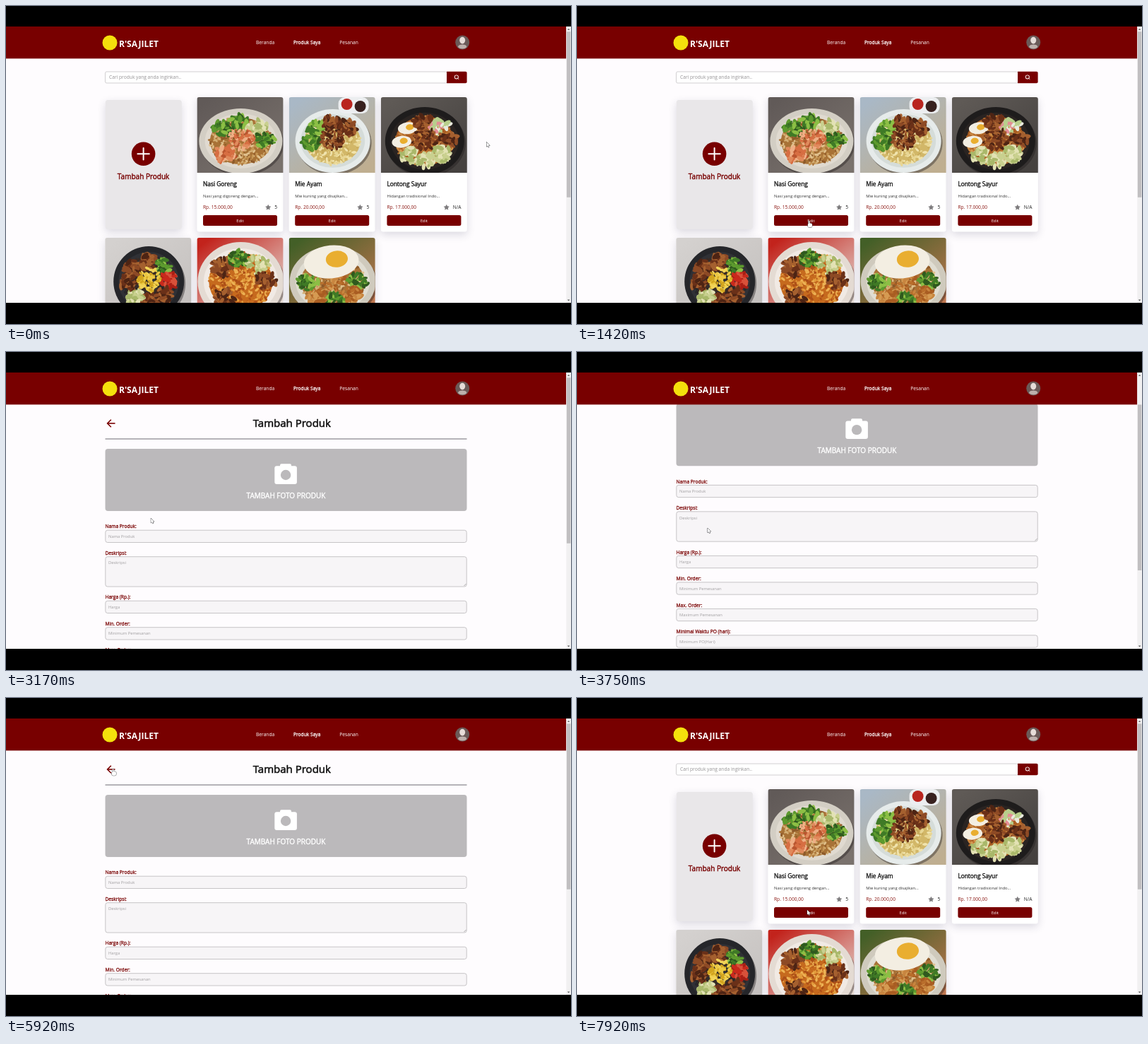
Write an HTML page with a canvas that moves like this. It is 800 px wide and 450 px high and loops after 8000 ms.

```html
<!DOCTYPE html>
<html lang="id">
<head>
<meta charset="utf-8">
<title>Produk Saya</title>
<style>
html, body { margin: 0; width: 100%; height: 100%; overflow: hidden; background: #000; }
canvas { display: block; width: 800px; height: 450px; }
</style>
</head>
<body>
<canvas id="stage"></canvas>
<script>
const canvas = document.getElementById('stage');
const ctx = canvas.getContext('2d');
const dpr = window.devicePixelRatio || 1;
canvas.width = 800 * dpr;
canvas.height = 450 * dpr;

const LOOP = 8000, STEP = 1000 / 12;
const OPEN_FORM = 2330, CLOSE_FORM = 6250;
const LEFT = 140.5, WIDTH = 512, MID = LEFT + WIDTH / 2;
const TOP = 29, BOTTOM = 420, MAX_SCROLL = 226;
const RED = '#780000', PAGE = '#fefcfe';
const FONT = '"Open Sans", "Noto Sans", sans-serif';
// Type sizes: a 1920 px wide page shown at 800 px
const XS = 14 / 2.4, S = 16 / 2.4, M = 20 / 2.4, L = 24 / 2.4, XL = 36 / 2.4;

const ramp = (t, from, to) => Math.min(1, Math.max(0, (t - from) / (to - from)));
const smooth = u => u * u * (3 - 2 * u);

// Pointer moves: start, end, x, y
const MOVES = [
  [0, 830, 460, 300], [916, 1416, 328.5, 304], [1500, 2000, 208.5, 233],
  [3090, 3420, 185, 249], [5500, 5916, 151.5, 100.5], [6420, 7330, 326, 300]
];

function pointerAt(t) {
  return MOVES.reduce(([x, y], [from, to, nx, ny]) => {
    const u = smooth(ramp(t, from, to));
    return [x + (nx - x) * u, y + (ny - y) * u];
  }, [680.5, 192.5]);
}

function scrollAt(t) {
  return MAX_SCROLL * (t < 4667
    ? ramp(t, 3420, 4166) ** 1.55
    : (1 - ramp(t, 4667, 5416)) ** 1.34);
}

function box(x, y, w, h, r, fill, stroke) {
  ctx.beginPath();
  ctx.roundRect(x, y, w, h, r);
  ctx.fillStyle = fill;
  ctx.fill();
  if (!stroke) return;
  ctx.strokeStyle = stroke;
  ctx.lineWidth = 0.85;
  ctx.stroke();
}

function oval(x, y, rx, ry, fill, turn = 0) {
  ctx.beginPath();
  ctx.ellipse(x, y, rx, ry, turn, 0, 2 * Math.PI);
  ctx.fillStyle = fill;
  ctx.fill();
}

function line(pts, color, w) {
  ctx.beginPath();
  pts.forEach(([x, y]) => ctx.lineTo(x, y));
  ctx.strokeStyle = color;
  ctx.lineWidth = w;
  ctx.stroke();
}

function poly(pts, fill) {
  ctx.beginPath();
  pts.forEach(([x, y]) => ctx.lineTo(x, y));
  ctx.fillStyle = fill;
  ctx.fill();
}

const triangle = (x, y, w, h, fill) => poly([[x - w, y], [x, y - h], [x + w, y]], fill);

// bold thickens the regular face slightly without widening it
function text(str, x, y, size, color, { bold = false, align = 'left', weight = 400 } = {}) {
  ctx.font = `${weight} ${size}px ${FONT}`;
  ctx.textAlign = align;
  ctx.fillStyle = color;
  ctx.fillText(str, x, y);
  if (!bold) return;
  ctx.strokeStyle = color;
  ctx.lineWidth = size / 26;
  ctx.lineJoin = 'round';
  ctx.strokeText(str, x, y);
}

const centered = (str, y, size, color, bold) =>
  text(str, MID, y, size, color, { bold, align: 'center' });

function panel(x, y, w, h, fill) {
  ctx.save();
  ctx.shadowColor = 'rgba(40,40,80,.17)';
  ctx.shadowBlur = 12 * dpr;
  ctx.shadowOffsetY = 4 * dpr;
  box(x, y, w, h, 3.5, fill);
  ctx.restore();
}

// ---- Food pictures ----

const FOOD = {
  green: ['#2f5a1e', '#5d9a2e', '#8cbf45', '#3f7a26'],
  pale: ['#c9d08f', '#e3e2b4', '#a9b86a'],
  meat: ['#4d2414', '#6a3018', '#8d4a25', '#a5602f'],
  shrimp: ['#d76e42', '#e08a5c', '#efae85', '#b9552f'],
  red: ['#a81f15', '#c9291c', '#d9513a'],
  petal: ['#e9eadd', '#e58d95', '#b8cf8c'],
  rice: ['#d3ae74', '#a87236', '#c69654', '#8e5a2a', '#e0c08c'],
  noodle: ['#f0e3ad', '#d2b768', '#e8d694', '#c6a858'],
  curry: ['#c8853f', '#a95d22', '#d59a52', '#b96e2c'],
  yellow: ['#f2d459', '#d3a51e', '#ecc944'],
  char: ['#303136', '#3a2b24', '#25262a'],
  saucy: ['#e29b3c', '#c66a1e', '#edb254', '#ad4f17']
};

// back: backdrop gradient; around: toppings clockwise from the upper left
const PHOTOS = {
  friedRice: { back: ['#615a58', '#7a726d'], plate: ['#d3cec4', '#e0dad0'], rx: 59, ry: 46,
    base: 'rice', around: ['green', 'green', 'pale', 'green', 0, 0, 'shrimp', 0], top: 'shrimp' },
  chickenNoodles: { back: ['#a9b8c6', '#bfae90'], plate: ['#e6ebea', '#d5dcd9'], rx: 53, ry: 45,
    base: 'noodle', around: ['green', 'meat', 'meat', 0, 0, 0, 0, 'green'], top: 'meat', sauces: true },
  curry: { back: ['#5f5a56', '#45413f'], plate: ['#1e1c1c', '#2a2422'], rx: 56, ry: 48,
    base: 'curry', around: ['egg', 'meat', 'petal', 'meat', 'pale', 'pale', 'pale', 'egg'], top: 'meat' },
  yellowRice: { back: ['#d4d1cf', '#c4c0be'], plate: ['#25262a', '#303136'], rx: 50, ry: 50,
    base: 'char', around: ['meat', 'meat', 'green', 'red', 'meat', 'meat', 'pale', 'meat'], top: 'yellow' },
  redNoodles: { back: ['#c2231c', '#e6ddd6'], plate: ['#e4dbd3', '#f1eae4'], rx: 61, ry: 56,
    base: 'saucy', around: ['meat', 'green', 'pale', 'meat', 0, 0, 'meat', 0], top: 'saucy' },
  eggRice: { back: ['#435f27', '#c0764f'], plate: ['#cfcabd', '#e0ddd2'], rx: 61, ry: 50,
    base: 'rice', around: [0, 0, 0, 'green', 'curry', 'green', 'curry', 'green'], top: 'curry', fried: true }
};

function random(seed) {
  return () => (seed = (seed * 16807) % 2147483647) / 2147483647;
}

function scatter(rnd, kind, x, y, rx, ry, n, size) {
  const colors = FOOD[kind];
  for (let i = 0; i < n; i++) {
    const a = rnd() * 2 * Math.PI, d = Math.sqrt(rnd()), s = size * (0.6 + rnd() * 0.7);
    oval(x + Math.cos(a) * d * rx, y + Math.sin(a) * d * ry, s, s / 2,
      colors[Math.floor(rnd() * colors.length)], rnd() * Math.PI);
  }
}

function egg(x, y, r) {
  oval(x, y, r, r * 0.6, '#f3eee2', -0.1);
  oval(x + r * 0.2, y - r * 0.1, r * 0.4, r * 0.3, '#e9ae30', -0.1);
}

function dish({ back, plate, rx, ry, base, around, top, sauces, fried }) {
  const rnd = random(rx * 100 + ry), x = 62, y = 62;
  const shade = ctx.createLinearGradient(20, 0, 100, 107);
  back.forEach((c, i) => shade.addColorStop(i, c));
  ctx.fillStyle = shade;
  ctx.fillRect(0, 0, 123, 108);
  oval(x + 2, y + 3, rx, ry, 'rgba(30,25,25,.4)');
  oval(x, y, rx, ry, plate[0]);
  oval(x, y, rx * 0.86, ry * 0.84, plate[1]);
  oval(x, y, rx * 0.74, ry * 0.72, FOOD[base][1]);
  scatter(rnd, base, x, y, rx * 0.74, ry * 0.72, 380, 3);
  around.forEach((kind, i) => {
    const a = -2.4 + i * Math.PI / 4;
    const px = x + Math.cos(a) * rx * 0.58, py = y + Math.sin(a) * ry * 0.56;
    if (kind === 'egg') egg(px, py, 14);
    else if (kind) scatter(rnd, kind, px, py, rx * 0.24, ry * 0.22, 40, 5);
  });
  scatter(rnd, top, x, y - 3, rx * 0.32, ry * 0.32, 80, 3.5);
  if (fried) egg(60, 34, 39);
  if (sauces) {
    box(70, 0, 43, 23, 9, '#eceef0');
    oval(82, 10, 8, 8, '#b9251f');
    oval(101, 13, 8, 8, '#38211f');
  }
}

// ---- Product list ----

const PRODUCTS = [
  ['friedRice', 'Nasi Goreng', 'Nasi yang digoreng dengan...', 'Rp. 15.000,00', '5'],
  ['chickenNoodles', 'Mie Ayam', 'Mie kuning yang disajikan...', 'Rp. 20.000,00', '5'],
  ['curry', 'Lontong Sayur', 'Hidangan tradisional Indo...', 'Rp. 17.000,00', 'N/A'],
  ['yellowRice'], ['redNoodles'], ['eggRice']
];

function star(x, y, r) {
  const pts = Array.from({ length: 10 }, (_, i) => {
    const a = -Math.PI / 2 + i * Math.PI / 5, d = i % 2 ? r * 0.5 : r;
    return [x + Math.cos(a) * d, y + Math.sin(a) * d];
  });
  poly(pts, '#7d7b7d');
}

function card([photo, title, about, price, rating], x, y) {
  panel(x, y, 122, 190.5, '#fff');
  ctx.save();
  ctx.beginPath();
  ctx.roundRect(x, y, 122, 107, [3, 3, 0, 0]);
  ctx.clip();
  ctx.translate(x, y);
  dish(PHOTOS[photo]);
  ctx.restore();
  if (!title) return;
  const left = x + 8.6, right = x + 113.6;
  text(title, left, y + 126, M, '#111', { bold: true });
  text(about, left, y + 141.5, XS, '#333');
  text(price, left, y + 158, S, '#8a1510');
  text(rating, right, y + 158, S, '#222', { align: 'right' });
  star(right - ctx.measureText(rating).width - 9, y + 156, 4.3);
  box(left, y + 167, 105, 15, 2.5, RED);
  text('Edit', x + 61, y + 176.7, XS, '#fff', { align: 'center' });
}

// Share of the last moments the pointer spent on the add card
function hover(t) {
  let n = 0;
  for (let i = 0; i < 6; i++) {
    const [x, y] = pointerAt(t - i * 30);
    if (x > 141 && x < 249 && y > 133 && y < 316) n++;
  }
  return n / 6;
}

function addCard(t) {
  const x = 194.6, y = 209.3, k = 1 + 0.2 * smooth(hover(t)), arm = 9.2 * k;
  panel(140.8, 133, 108, 183, '#e9e7e9');
  oval(x, y, 16.8 * k, 16.8 * k, RED);
  box(x - arm, y - 1, arm * 2, 2, 1, '#fff');
  box(x - 1, y - arm, 2, arm * 2, 1, '#fff');
  text('Tambah Produk', x, 245, L, RED, { bold: true, align: 'center' });
}

function products(t) {
  box(LEFT, 93, 484, 16, 2, '#fff', '#c9c7c9');
  text('Cari produk yang anda inginkan..', 146, 103.3, S, '#949294');
  box(624, 92.7, 28.6, 16.6, [0, 2, 2, 0], RED);
  oval(637.8, 100.4, 3, 3, '#fff');
  oval(637.8, 100.4, 2.1, 2.1, RED);
  line([[639.7, 102.3], [641.3, 103.9]], '#fff', 0.9);
  addCard(t);
  PRODUCTS.forEach((p, i) => {
    const slot = i < 3 ? i + 1 : i - 3;
    card(p, 140.2 + slot * 130.2, i < 3 ? 129 : 328);
  });
}

// ---- Product form ----

const FIELDS = [
  ['Nama Produk:', 'Nama Produk'], ['Deskripsi:', 'Deskripsi', 42.3], ['Harga (Rp.):', 'Harga'],
  ['Min. Order:', 'Minimum Pemesanan'], ['Max. Order:', 'Maximum Pemesanan'],
  ['Minimal Waktu PO (hari):', 'Minimum PO(Hari)']
];

function fields(t) {
  let y = 252.2;
  for (const [label, hint, h = 17.3] of FIELDS) {
    text(label, LEFT, y - 2.8, S, RED, { bold: true });
    box(LEFT + 0.3, y, WIDTH - 0.6, h, 3, '#f7f5f7', '#bdbbbd');
    text(hint, 145, y + 10.7, XS, '#a09ea0');
    if (h > 20) line([[648.5, y + h - 1], [651.5, y + h - 4]], '#888', 0.7);
    y += h + 20.2;
  }
  if (t > 4100 && t < 4900) {
    triangle(644.8, 472.6, 1.8, 2.2, '#444');
    triangle(644.8, 474.4, 1.8, -2.2, '#444');
  }
}

function footer(y) {
  ctx.fillStyle = RED;
  ctx.fillRect(0, y, 794, 150);
  centered("R'Sajilet", y + 26.4, L, '#fff', true);
  centered('Jelajahi dunia rasa yang tak terbatas dan hadirkan kelezatan sempurna ke setiap acaramu dengan',
    y + 41.2, M, '#f0e2e2');
  centered('Rsajilet.', y + 52.7, M, '#f0e2e2');
  line([[301, y + 63.2], [492, y + 63.2]], '#c9a3a3', 0.8);
}

function form(t) {
  ctx.lineJoin = 'miter';
  line([[154.5, 101], [143.8, 101]], RED, 1.6);
  line([[148.8, 95.8], [143.6, 101], [148.8, 106.2]], RED, 1.6);
  text('Tambah Produk', 404.8, 106.3, XL, '#111', { bold: true, align: 'center' });
  box(LEFT, 122.2, WIDTH, 1.5, 0, '#9c9ba1');

  box(LEFT, 137, WIDTH, 88, 4, '#bbb9bb');
  box(380.3, 161.3, 31.6, 25.6, 3, '#fff');
  box(388, 158.2, 16, 6, 2, '#fff');
  oval(396.1, 174, 7.2, 7.2, '#bbb9bb');
  centered('TAMBAH FOTO PRODUK', 206.7, L, '#fff', true);

  fields(t);
  box(374, 510.6, 45, 16.4, 2.5, RED);
  centered('SUBMIT', 521.2, S, '#fff');
  footer(545.2);
}

// ---- Frame around the pages ----

function navbar() {
  ctx.fillStyle = RED;
  ctx.fillRect(0, TOP, 793.3, 45.4);
  oval(147, 52, 10.5, 10.5, '#f4e00c');
  text("R'SAJILET", 160, 58.4, 12, '#fff', { weight: 700 });
  text('Beranda', 354, 53.8, S, '#fff');
  text('Produk Saya', 407, 53.8, S, '#fff', { bold: true });
  text('Pesanan', 472.3, 53.8, S, '#fff');
  oval(646.2, 51.6, 10, 10, '#6b5a58');
  oval(646.2, 48.6, 4, 4.8, '#e6dcd8');
  oval(646.2, 57.4, 6, 3, '#bdb0ac');
}

function scrollbar(scroll) {
  box(793.3, TOP, 6.7, BOTTOM - TOP, 0, '#f1f0f1');
  box(793.9, 36.2 + scroll * 0.6, 5.5, 234.5, 0, '#c1bfc1');
  triangle(796.6, 34, 1.7, 2, '#666');
  triangle(796.6, 415.4, 1.7, -2, '#555');
}

function pointer(x, y, hand) {
  ctx.save();
  ctx.translate(x, y);
  ctx.lineJoin = 'round';
  ctx.beginPath();
  if (hand) {
    ctx.roundRect(-0.8, 0, 1.7, 6, 0.8);
    ctx.roundRect(-1.6, 3.6, 6, 5.6, 1.6);
  } else {
    [[0, 0], [0, 6.6], [1.5, 5.3], [2.5, 7.6], [3.5, 7.1], [2.5, 5], [4.6, 4.8]]
      .forEach(([px, py]) => ctx.lineTo(px, py));
    ctx.closePath();
  }
  ctx.strokeStyle = '#3a3a3e';
  ctx.lineWidth = 0.95;
  ctx.stroke();
  ctx.fillStyle = '#fff';
  ctx.fill();
  ctx.restore();
}

function draw(t) {
  const onForm = t >= OPEN_FORM && t < CLOSE_FORM;
  const hand = (t > 830 && t < OPEN_FORM) || (t > 5830 && t < CLOSE_FORM);
  const scroll = scrollAt(t);
  ctx.setTransform(dpr, 0, 0, dpr, 0, 0);
  box(0, 0, 800, 450, 0, '#000');
  ctx.save();
  ctx.beginPath();
  ctx.rect(0, TOP, 800, BOTTOM - TOP);
  ctx.clip();
  box(0, TOP, 800, BOTTOM - TOP, 0, PAGE);
  ctx.save();
  ctx.translate(0, -scroll);
  (onForm ? form : products)(t);
  ctx.restore();
  navbar();
  scrollbar(scroll);
  pointer(...pointerAt(t), hand);
  ctx.restore();
}

const start = performance.now();
let last = -1;
function tick() {
  const t = (performance.now() - start) % LOOP;
  const step = Math.floor(t / STEP + 0.05) % 96;
  if (step !== last) draw((last = step) * STEP);
  requestAnimationFrame(tick);
}
tick();
</script>
</body>
</html>
```
